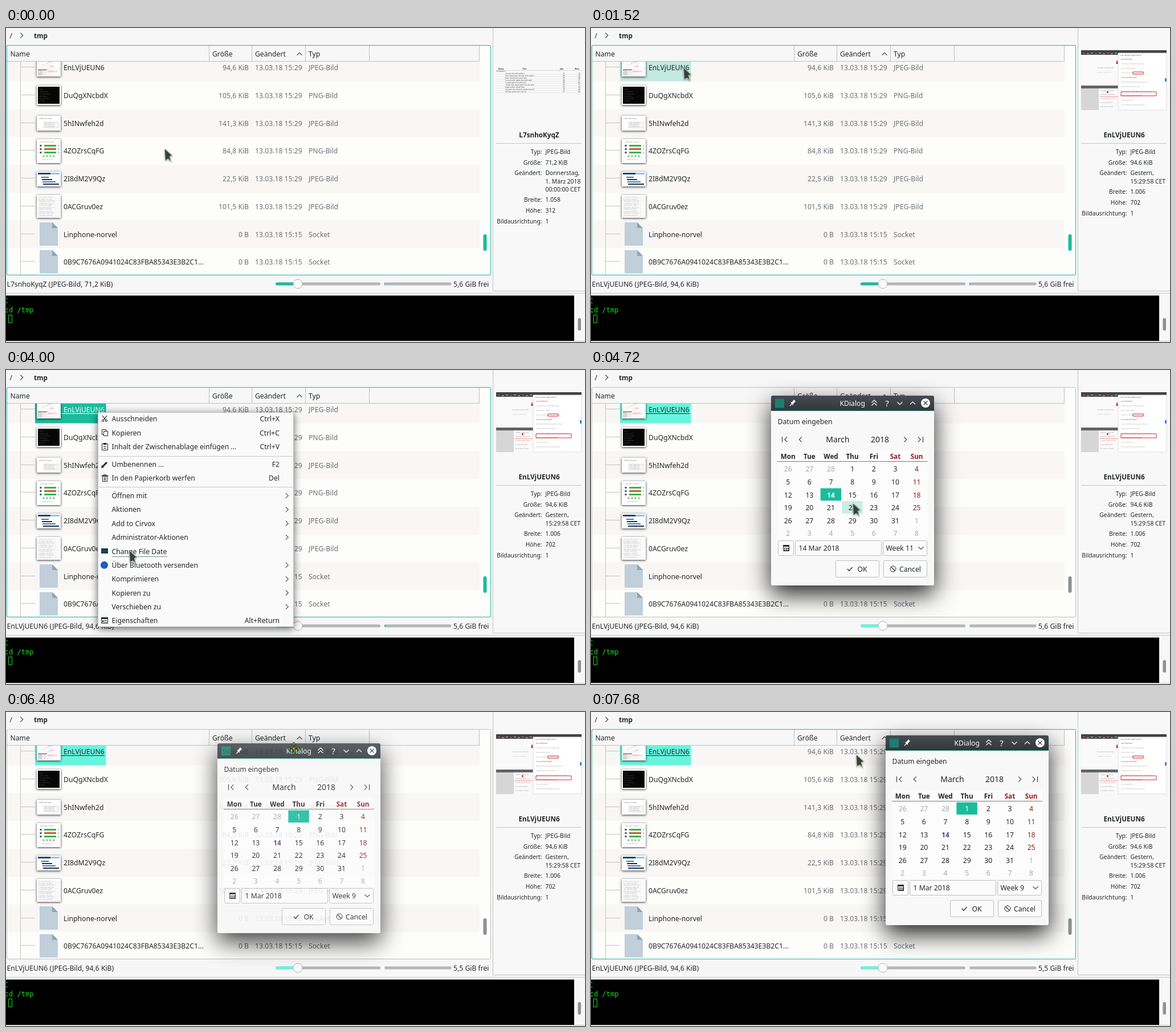
Recreate the animation shown at these times as an HTML page with a canvas. Size 1016x551 px, loop 8 s.

```html
<!DOCTYPE html>
<html lang="de">
<meta charset="utf-8">
<title>Dateidatum ändern</title>
<style>
html, body { margin: 0; height: 100%; overflow: hidden; background: #f7f7f7 }
canvas { display: block }
</style>
<canvas id="stage" width="1016" height="551"></canvas>
<script>
const LOOP = 8000, STEP = 80;
const INK = '#232627', SOFT = '#6b6f72', EDGE = '#bcbfc1', TEAL = '#1abc9c', MINT = '#68f5dd', RED = '#961b1e';
const screen2d = document.getElementById('stage').getContext('2d');
const buffer = document.createElement('canvas');
buffer.width = 1016;
buffer.height = 551;
const buffer2d = buffer.getContext('2d');
let c = screen2d, t = 0;

const ramp = (a, b) => Math.min(1, Math.max(0, (t - a) / (b - a)));
const between = (a, b) => t >= a && t < b;

// time, x, y of the pointer tip
const path = [
  [0, 279, 213], [360, 279, 213], [800, 212, 112], [1200, 162, 70], [1520, 163, 71],
  [2320, 461, 64], [2400, 461, 64], [2480, 362, 68], [2800, 161, 73], [3040, 161, 73],
  [3680, 217, 318], [4480, 217, 318], [4720, 460, 235], [5120, 455, 172], [5760, 455, 172],
  [6240, 450, 54], [6400, 469, 59], [6480, 505, 64], [6560, 574, 59], [6640, 642, 52],
  [6720, 651, 50], [6880, 651, 50], [7520, 440, 77], [7680, 466, 76], [LOOP, 466, 76]
];
function pointerAt(time) {
  const i = path.findIndex((p, k) => k && time <= p[0]);
  const [t0, x0, y0] = path[i - 1], [t1, x1, y1] = path[i];
  const k = (time - t0) / (t1 - t0);
  return [x0 + (x1 - x0) * k, y0 + (y1 - y0) * k];
}

function rect(x, y, w, h, fill, stroke, r = 0) {
  c.beginPath();
  c.roundRect(x, y, w, h, r);
  if (fill) { c.fillStyle = fill; c.fill(); }
  if (stroke) { c.strokeStyle = stroke; c.lineWidth = 1; c.stroke(); }
}
function line(color, width, ...p) {
  c.beginPath();
  for (let i = 0; i < p.length; i += 2) c.lineTo(p[i], p[i + 1]);
  c.strokeStyle = color;
  c.lineWidth = width;
  c.stroke();
}
function shape(color, ...p) {
  c.beginPath();
  for (let i = 0; i < p.length; i += 2) c.lineTo(p[i], p[i + 1]);
  c.closePath();
  c.fillStyle = color;
  c.fill();
}
function circle(x, y, r, fill, stroke) {
  rect(x - r, y - r, 2 * r, 2 * r, fill, stroke, r);
}
function text(s, x, y, color = INK, align = 'left', size = 12.2, weight = 400) {
  c.font = `${weight} ${size}px "Noto Sans", sans-serif`;
  c.textAlign = align;
  c.fillStyle = color;
  c.fillText(s, x, y);
}
const bold = (s, x, y, color, align) => text(s, x, y, color, align, 11.7, 700);
function shadow(blur, dy, alpha, draw) {
  c.save();
  c.shadowColor = `rgba(0,0,0,${alpha})`;
  c.shadowBlur = blur;
  c.shadowOffsetY = dy;
  draw();
  c.restore();
}
function layer(alpha, draw) {
  if (alpha <= 0) return;
  c = buffer2d;
  c.clearRect(0, 0, 1016, 551);
  draw();
  c = screen2d;
  c.globalAlpha = alpha;
  c.drawImage(buffer, 0, 0);
  c.globalAlpha = 1;
}
function chevron(x, y, dir, color = '#4d5154', s = 4.5) {
  c.save();
  c.translate(x, y);
  c.rotate({ right: 0, down: 1, left: 2, up: 3 }[dir] * Math.PI / 2);
  line(color, 1.2, -s / 2, -s, s / 2, 0, -s / 2, s);
  c.restore();
}
const LOREM = 'datei ordner inhalt liste name wert neu alt zeile spalte text bild seite punkt form daten ';
function tiny(x, y, n, color = '#8a8a8a', size = 3) {
  const from = Math.round(x * 3 + y * 7) % 40;
  text(LOREM.slice(from, from + n), x, y, color, 'left', size);
}

// Screenshot preview, 150 x 105 units
function shot(x, y, scale) {
  c.save();
  c.translate(x, y);
  c.scale(scale, scale);
  rect(0, 0, 150, 105, '#fafafa');
  rect(0, 0, 150, 8, '#414245');
  for (let i = 0; i < 9; i++) rect(3 + i * 7, 4 + i % 2, 4, 2, i % 3 ? '#8b8b8b' : '#b44');
  shape('#e02a2a', 61, 24, 63, 17, 66, 24);
  tiny(28, 32, 22, '#aaa');
  tiny(28, 40, 20, '#ccc');
  rect(0, 62, 65, 5, '#626366');
  rect(0, 67, 31, 38, '#d6d6d7');
  for (let i = 0; i < 5; i++) tiny(34, 72 + i * 7, 18, i == 2 ? '#d99' : '#aaa');
  rect(45, 72, 3, 3, '#e33');
  rect(32, 81, 33, 1, '#e99');
  rect(65, 5, 85, 100, '#fff', '#ddd');
  tiny(68, 10, 30, '#666');
  for (let i = 0; i < 11; i++) tiny(70, 17 + i * 8, 16 + i * 13 % 23, i % 4 ? '#b4b4b4' : '#666');
  rect(91, 38, 18, 4, null, '#e8222c');
  rect(70, 73, 62, 7, null, '#e8222c');
  rect(147, 49, 3, 6, '#3b86d8');
  c.restore();
}
function table() {
  for (const [s, x] of [['Name', 864], ['Titel', 906], ['Jahr', 972], ['Wert', 998]]) text(s, x, 73, '#333', 'left', 3.2, 700);
  line('#bbb', .5, 860, 74.5, 1010, 74.5);
  tiny(861, 77, 12, '#444');
  for (let i = 0; i < 9; i++) {
    const y = 80.5 + i * 4;
    tiny(876, y, 26 + i * 11 % 22, '#555', 3.1);
    text(21 + i * 7 % 50, 977, y, '#444', 'left', 3.1);
    text(12 + i * 13 % 60, 1004, y, '#444', 'left', 3.1);
    line('#ddd', .5, 860, y + 1, 1010, y + 1);
  }
}

const files = [
  ['EnLVjUEUN6', '94,6 KiB', 'JPEG', 28], ['DuQgXNcbdX', '105,6 KiB', 'PNG', 32],
  ['5hINwfeh2d', '141,3 KiB', 'JPEG', 24], ['4ZOZrsCqFG', '84,8 KiB', 'PNG', 40],
  ['2I8dM2V9Qz', '22,5 KiB', 'JPEG', 24], ['0ACGruv0ez', '101,5 KiB', 'JPEG', 38],
  ['Linphone-norvel', '0 B'], ['0B9C7676A0941024C83FBA85343E3B2C1...', '0 B']
];
function thumb(i, mid, h) {
  if (!h) {
    shape('#c0cfd9', 59, mid - 21, 81, mid - 21, 91, mid - 11, 91, mid + 20, 59, mid + 20);
    shape('#8fa3b2', 81, mid - 21, 91, mid - 11, 81, mid - 11);
    return;
  }
  const y = Math.round(mid - h / 2);
  shadow(4, 1, .8, () => rect(54, y - 1, 42, h + 2, '#fff'));
  if (i == 0) shot(56, y + 1, .253);
  if (i == 1) {
    rect(56, y + 1, 38, h - 2, '#060606');
    for (let k = 0; k < 6; k++) tiny(58, y + 7 + k * 4, 8 + k * 5 % 12, '#484848', 2.6);
  }
  if (i == 2) {
    tiny(58, y + 5, 16, '#888');
    rect(66, y + 10, 26, 10, '#f7f7f7', '#ddd');
    for (let k = 0; k < 3; k++) tiny(68, y + 13 + k * 3, 14, '#aaa', 2.6);
  }
  if (i == 3) {
    tiny(60, y + 5, 17, '#999');
    ['#35b34a', '#d2572f', '#35b34a'].forEach((color, k) => {
      rect(67, y + 9 + k * 6, 21, 3, color);
      circle(61, y + 10.5 + k * 6, 1.8, '#555');
      circle(92, y + 10.5 + k * 6, 1, '#6aa2d8');
    });
    for (let k = 0; k < 4; k++) circle(66 + k * 6, y + 29, 2, '#9bcf9f');
    tiny(63, y + 36, 15, '#aaa');
  }
  if (i == 4) {
    rect(56, y + 1, 38, 3, '#20456e');
    rect(78, y + 1, 16, 3, '#8fc4ee');
    for (let k = 0; k < 4; k++) rect(62 + k, y + 8 + k * 4, 13 + k * 5, 2, k % 2 ? '#1d2f49' : '#3d78b4');
  }
  if (i == 5) {
    for (let k = 0; k < 10; k++) {
      tiny(57, y + 4 + k * 3.5, 22, '#b8b8b8', 2.7);
      line('#ddd', .5, 56, y + 5 + k * 3.5, 94, y + 5 + k * 3.5);
    }
    for (const x of [65, 77, 87]) line('#ddd', .5, x, y + 1, x, y + h - 1);
  }
}

function fileView(inactive) {
  rect(1, 30, 850, 404, '#fdfdfc');
  c.save();
  c.beginPath();
  c.rect(2, 59, 848, 374);
  c.clip();
  files.forEach(([name, size, kind, h], i) => {
    const mid = 69.5 + i * 48.75, base = Math.round(mid + 4.6);
    if (i % 2 == 0) rect(2, mid - 24.4, 829, 48.75, '#f8f7f6');
    line('#c2c2c2', 1, 25.5, Math.floor(mid) - .5, 51, Math.floor(mid) - .5);
    let color = INK;
    if (i == 0) {
      const hover = ramp(880, 1040) - ramp(1520, 1760) + ramp(2560, 2800);
      rect(51, 59, 124.5, 34.5, inactive ? MINT : t >= 2960 ? TEAL : `rgba(26,188,156,${.24 * hover})`);
      if (t >= 2960) {
        color = inactive ? INK : '#fff';
        line(color, 1, 97, 76.5, 173, 76.5);
      }
    }
    thumb(i, mid, h);
    text(name, 101, base, color);
    text(size, 426, base, SOFT, 'right');
    text(h ? '13.03.18 15:29' : '13.03.18 15:15', 437, base, SOFT);
    text(h ? kind + '-Bild' : 'Socket', 531, base, SOFT);
  });
  line('#c2c2c2', 1, 25.5, 59, 25.5, 433);
  c.restore();

  rect(2, 31, 829, 28, '#f7f7f7');
  line(EDGE, 1, 2, 58.5, 831, 58.5);
  for (const x of [356, 431, 525, 637, 830]) line(EDGE, 1, x + .5, 31, x + .5, 59);
  [['Name', 7.5], ['Größe', 362], ['Geändert', 437], ['Typ', 531]].forEach(([s, x]) => text(s, x, 49.5));
  chevron(515, 45.5, 'up');
  rect(837.5, 362, 6, 29, inactive ? '#8e9092' : TEAL, null, 3);
  rect(1.5, 30.5, 849, 403, null, EDGE, 2);
  c.globalAlpha = 1 - ramp(4480, 4720) + ramp(7120, 7520);
  rect(1.5, 30.5, 849, 403, null, '#27b497', 2);
  c.globalAlpha = 1;
}

function infoPanel() {
  rect(854, 0, 162, 461, '#f8f8f8');
  line('#bfc1c2', 1, 854.5, 0, 854.5, 461.5, 1016, 461.5);
  const fade = ramp(1040, 1280) - ramp(1920, 2240) + ramp(3200, 3520);
  layer(1 - fade, table);
  layer(fade, () => shot(860, 39, 1));
  const hot = between(1120, 1920) || t >= 3120;
  bold(hot ? 'EnLVjUEUN6' : 'L7snhoKyqZ', 935.5, 192, INK, 'center');
  line('#c4c6c7', 1, 860, 202.5, 1010, 202.5);
  const rows = hot
    ? [['Typ', 'JPEG-Bild'], ['Größe', '94,6 KiB'], ['Geändert', 'Gestern,', '15:29:58 CET'], ['Breite', '1.006'], ['Höhe', '702']]
    : [['Typ', 'JPEG-Bild'], ['Größe', '71,2 KiB'], ['Geändert', 'Donnerstag,', '1. März 2018', '00:00:00 CET'], ['Breite', '1.058'], ['Höhe', '312']];
  let y = 221;
  for (const [label, ...values] of [...rows, ['Bildausrichtung', '1']]) {
    text(label + ':', 940.5, y, INK, 'right', 10.3);
    values.forEach((v, i) => text(v, 946.5, y + i * 14.1, INK, 'left', 10.3));
    y += 4.6 + values.length * 14.1;
  }
}

function bars(inactive) {
  text('/', 6.5, 17.5);
  chevron(27.5, 13, 'right');
  bold('tmp', 49, 17.5);
  const hot = between(960, 1600) || t >= 2720;
  text(hot ? 'EnLVjUEUN6 (JPEG-Bild, 94,6 KiB)' : 'L7snhoKyqZ (JPEG-Bild, 71,2 KiB)', 1.5, 453.5);
  rect(473, 446.5, 184, 5, '#b5b5b5', null, 2.5);
  rect(473, 446.5, 40, 5, inactive ? MINT : TEAL, null, 2.5);
  circle(512, 449, 8, '#fbfbfb', '#b0b2b4');
  rect(664, 446.5, 117.5, 5, '#b5b5b5', null, 2.5);
  rect(664, 447, 1.5, 4, inactive ? MINT : TEAL);
  text(t < 5280 ? '5,6 GiB frei' : '5,5 GiB frei', 785, 453.5);
}

function terminal() {
  line('#c6c8c9', 1, 0, 465.5, 1016, 465.5);
  rect(0, 469.5, 997, 79.5, '#000');
  line('#c6c8c9', 1, 0, 549.5, 1016, 549.5);
  rect(1003.5, 509, 5.5, 22, '#8e9092', null, 3);
  c.font = '12px "DejaVu Sans Mono", monospace';
  c.textAlign = 'left';
  c.fillStyle = '#1be01b';
  c.fillText('C', -3.5, 482.5);
  c.fillText('cd /tmp', -2.2, 499);
  rect(4.5, 503.5, 6, 14, null, '#1be01b');
}

const menuItems = [
  ['Ausschneiden', 85.5, 'Ctrl+X'], ['Kopieren', 110, 'Ctrl+C'],
  ['Inhalt der Zwischenablage einfügen ...', 134.3, 'Ctrl+V'],
  ['Umbenennen ...', 165.3, 'F2'], ['In den Papierkorb werfen', 189.5, 'Del'],
  ['Öffnen mit', 220.4], ['Aktionen', 244.8], ['Add to Cirvox', 269.2], ['Administrator-Aktionen', 293.6],
  ['Change File Date', 318, ' '], ['Über Bluetooth versenden', 342.4], ['Komprimieren', 366.7],
  ['Kopieren zu', 391], ['Verschieben zu', 415.3], ['Eigenschaften', 439.7, 'Alt+Return']
];
function menu() {
  shadow(14, 3, .6, () => rect(161, 74, 344, 377, '#fafafa', null, 2));
  rect(161.5, 74.5, 343, 376, '#fafafa', EDGE, 2);
  for (const y of [151.5, 205.5]) line('#c4c6c7', 1, 163, y, 503, y);
  for (const [label, y, key] of menuItems) {
    text(label, 185.5, y + 4.5);
    if (key) text(key, 480, y + 4.5, INK, 'right');
    else chevron(493, y, 'right');
  }
  if (t >= 4000) line('#7d8a86', 1, 186, 327.5, 283, 327.5);
  line(INK, 1.2, 169, 80, 175, 88);
  line(INK, 1.2, 177, 80, 171, 88);
  circle(170, 89, 1.7, null, INK);
  circle(176, 89, 1.7, null, INK);
  rect(168.5, 104.5, 7, 9, null, INK);
  rect(171.5, 107.5, 7, 8, '#fafafa', INK);
  rect(168.5, 129.5, 10, 11, null, INK);
  rect(171, 128, 5, 3, INK);
  line(INK, 1, 171, 134.5, 176, 134.5);
  line(INK, 1, 171, 137.5, 176, 137.5);
  line(INK, 3, 170, 169, 177, 162);
  shape(INK, 167, 172, 168, 167, 172, 171);
  rect(169.5, 186.5, 8, 9, null, INK);
  line(INK, 1.2, 167, 185.5, 180, 185.5);
  rect(171.5, 183.5, 4, 2, null, INK);
  line(INK, 1, 172.5, 188, 172.5, 194);
  line(INK, 1, 174.5, 188, 174.5, 194);
  rect(167, 313, 12, 9, '#1d3f4a');
  circle(172.5, 342.3, 6.5, '#2457c0');
  rect(167.5, 434.5, 11, 10, null, INK);
  rect(167, 434, 12, 3, INK);
  rect(169, 439, 2, 4, INK);
  line(INK, 1, 172, 439.5, 177, 439.5);
  line(INK, 1, 172, 442.5, 177, 442.5);
}

function dialog(dx, dy, mx, my) {
  const picked = t < 5280 ? 16 : 3;
  c.save();
  c.translate(dx, dy);
  shadow(42, 16, .85, () => rect(0, 0, 286, 333, '#f8f8f8', null, 3));
  const bar = c.createLinearGradient(0, 0, 0, 27);
  bar.addColorStop(0, '#454c51');
  bar.addColorStop(1, '#31363b');
  rect(0, 0, 286, 27, bar, null, [3, 3, 0, 0]);
  line('#2a8f7d', 1, 0, 26.5, 286, 26.5);
  rect(7, 5.5, 16, 16, '#1d7f70');
  line('#fff', 1.2, 33, 18, 37, 14);
  shape('#fff', 34, 12, 39, 17, 39, 14, 43, 10, 40, 7, 37, 11);
  text('KDialog', 120.5, 17.5, '#fcfcfc');
  chevron(181, 10, 'up', '#fff');
  chevron(181, 15, 'up', '#fff');
  text('?', 203.5, 18.5, '#fff', 'center', 15);
  chevron(226, 13.5, 'down', '#fff');
  chevron(248.5, 13, 'up', '#fff');
  circle(271, 13, 8, '#fff');
  line('#3b4146', 1.2, 267.5, 9.5, 274.5, 16.5);
  line('#3b4146', 1.2, 274.5, 9.5, 267.5, 16.5);

  text('Datum eingeben', 11.5, 49.5);
  line(INK, 1, 19.5, 72, 19.5, 82);
  chevron(26, 77, 'left');
  chevron(51.5, 77, 'left');
  text('March', 117, 82, INK, 'center', 14);
  text('2018', 191, 82, INK, 'center', 14);
  chevron(235.5, 77, 'right');
  chevron(260, 77, 'right');
  line(INK, 1, 266.5, 72, 266.5, 82);

  rect(11, 96, 264, 157, '#fcfcfc');
  ['Mon', 'Tue', 'Wed', 'Thu', 'Fri', 'Sat', 'Sun'].forEach((d, i) =>
    bold(d, 29.7 + i * 37.65, 110.5, i > 4 ? RED : INK, 'center'));
  line('#77797b', 1, 11, 115.5, 275, 115.5);
  const hoverCol = Math.floor((mx - dx - 11.4) / 37.65), hoverRow = Math.floor((my - dy - 117.4) / 22.55);
  for (let i = 0; i < 42; i++) {
    const col = i % 7, row = Math.floor(i / 7), day = i - 2;
    const x = 11.4 + col * 37.65, y = 117.4 + row * 22.55;
    const other = day < 1 || day > 31;
    const label = day < 1 ? day + 28 : day > 31 ? day - 31 : day;
    if (i == picked) rect(x, y, 36.5, 21.7, TEAL);
    else if (col == hoverCol && row == hoverRow) rect(x, y, 36.5, 21.7, '#c8eee5');
    const color = i == picked ? '#fff' : other ? '#a6a8a9' : day == 14 ? '#5b3f85' : col == 6 ? RED : INK;
    (day == 14 ? bold : text)(label, x + 18.3, y + 16, color, 'center');
  }

  const button = (x, y, w, h) => rect(x + .5, y + .5, w, h, '#fbfbfb', EDGE, 2);
  button(12, 254, 27, 26);
  rect(21.5, 262.5, 10, 10, null, INK);
  rect(21, 262, 11, 3, INK);
  for (let k = 0; k < 6; k++) rect(23 + k % 3 * 3, 267 + (k > 2) * 3, 2, 2, INK);
  button(42, 254, 151, 26);
  text(picked == 16 ? '14 Mar 2018' : '1 Mar 2018', 48.5, 271.5);
  button(196, 254, 77, 26);
  text(picked == 16 ? 'Week 11' : 'Week 9', 201.5, 271.5);
  chevron(263, 267.5, 'down');
  button(113, 289, 76, 29);
  line(INK, 1.2, 134, 304, 137, 307.5, 142.5, 301);
  text('OK', 151.5, 308.5);
  button(197, 289, 76, 29);
  circle(214, 304, 5, null, INK);
  line(INK, 1.1, 210.5, 300.5, 217.5, 307.5);
  text('Cancel', 225, 308.5);
  c.restore();
}

function pointer(x, y, moving) {
  c.save();
  c.translate(x, y);
  if (moving) {
    for (let i = 0; i < 4; i++) {
      c.rotate(Math.PI / 2);
      line('#3b4a34', 3, 0, 2, 0, 7);
      shape('#3b4a34', -5, 6, 5, 6, 0, 11.5);
      shape('#58b83c', -2.5, 7, 2.5, 7, 0, 10);
    }
    circle(0, 0, 2.5, '#d98a3a', '#3b4a34');
  } else {
    const arrow = [0, 0, 11.5, 10.5, 7.5, 12, 9.5, 19.5, 5.5, 16, 1, 18.5];
    shadow(3, 1, .4, () => line('#a9bd93', 2, ...arrow, 0, 0));
    shape('#3a3e41', ...arrow);
  }
  c.restore();
}

function draw(now) {
  t = Math.floor(now % LOOP / STEP) * STEP;
  const inactive = t >= 4160;
  const [mx, my] = pointerAt(t);
  const [gx, gy] = pointerAt(Math.min(6720, Math.max(6240, t)));
  rect(0, 0, 1016, 551, '#f7f7f7');
  fileView(inactive);
  infoPanel();
  bars(inactive);
  terminal();
  layer(ramp(2960, 3200) - ramp(4080, 4320), menu);
  const ghost = .13 * (ramp(6240, 6400) - ramp(6720, 6880));
  layer(ramp(4480, 4720) - ghost, () => dialog(gx - 134, gy - 9, mx, my));
  pointer(mx, my, between(6320, 6720));
  requestAnimationFrame(draw);
}
requestAnimationFrame(draw);
</script>
</html>
```
